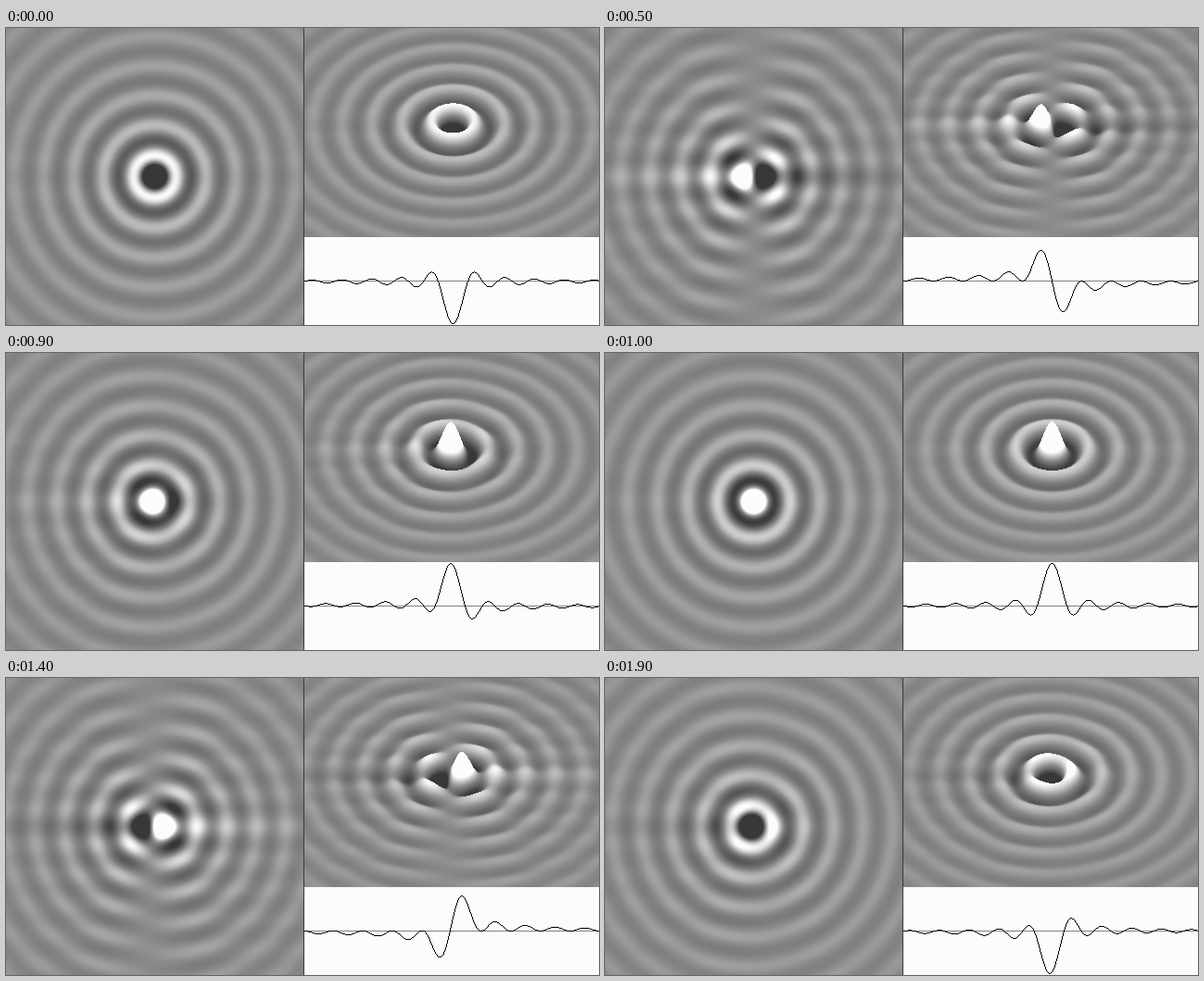
These frames come from a looping animation (640 px wide and 321 px high, 2 s). A matplotlib script:

```python
import numpy as np
import matplotlib.pyplot as plt
from matplotlib.animation import FuncAnimation

W, H, DPI = 640, 321, 100
FRAMES, INTERVAL = 20, 100
K = 2 * np.pi / 32              # wave number, wavelength 32 px
RIM = 0.01                      # slight excess of waves at the equator
CENTER = 160
SPLIT = 321                     # column of the divider
VIEW_H = 226                    # height of the perspective view
BASE_Y, TILT, LIFT = 105, 0.70, 30
AXIS_Y, AMP = 273, 46
DARK, MID, LIGHT = 56, 140, 252

z_tab = np.linspace(0, 50, 5001)
angles = (np.arange(120) + 0.5) * np.pi / 120
j0_tab = np.cos(z_tab[:, None] * np.sin(angles)).mean(axis=1)


def bessel0(z):
    return np.interp(np.abs(z), z_tab, j0_tab)


def hemisphere_waves(x, y):
    """Even and odd parts of plane waves summed over a half sphere."""
    mu, w = np.polynomial.legendre.leggauss(80)
    mu, w = (mu + 1) / 2, w / 2
    y = y[:, None]
    radial = bessel0(K * y * np.sqrt(1 - mu**2)) * w
    odd = radial @ np.sin(K * mu[:, None] * x)
    even = np.sinc(K * np.hypot(x, y) / np.pi) + RIM * bessel0(K * y)
    return even, odd


def shade(u):
    gain = np.where(u > 0, 500, 360)
    return np.clip(MID + gain * u, DARK, LIGHT).astype(np.uint8)


x_flat = np.arange(SPLIT) - CENTER
x_view = np.arange(W - SPLIT - 1) - CENTER
x_line = np.arange(-0.5, len(x_view)) - CENTER
y_view = np.arange(-185, 200, 0.25)
flat = hemisphere_waves(x_flat, x_flat)
view = hemisphere_waves(x_view, y_view)
line = hemisphere_waves(x_view, np.zeros(1))
edges = hemisphere_waves(x_line, np.zeros(1))
cols = np.broadcast_to(np.arange(len(x_view)), view[0].shape)
plot_rows = np.arange(VIEW_H, H)[:, None]


def wave(parts, phase):
    even, odd = parts
    return -np.cos(phase) * even - np.sin(phase) * odd


def perspective(u):
    """Paint the surface from back to front so near crests hide far ones."""
    rows = np.rint(BASE_Y + TILT * y_view[:, None] - LIFT * u).astype(int)
    seen = (rows >= 0) & (rows < VIEW_H)
    out = np.full((VIEW_H, len(x_view)), MID, np.uint8)
    out[rows[seen], cols[seen]] = shade(u)[seen]
    return out


def graph(phase):
    """Section through the centre as a one-pixel line."""
    y = AXIS_Y - AMP * wave(line, phase)[0]
    ends = AXIS_Y - AMP * wave(edges, phase)[0]
    low = np.minimum(ends[:-1], ends[1:])
    high = np.maximum(ends[:-1], ends[1:])
    inside = (plot_rows >= low) & (plot_rows < high)
    out = np.full(inside.shape, LIGHT, np.uint8)
    out[AXIS_Y - VIEW_H] = 128
    out[inside | (plot_rows == np.rint(y))] = 0
    return out


def picture(phase):
    img = np.empty((H, W), np.uint8)
    img[:, :SPLIT] = shade(wave(flat, phase))
    img[:, SPLIT] = DARK
    img[:VIEW_H, SPLIT + 1:] = perspective(wave(view, phase))
    img[VIEW_H:, SPLIT + 1:] = graph(phase)
    return img


fig = plt.figure(figsize=(W / DPI, H / DPI), dpi=DPI)
ax = fig.add_axes([0, 0, 1, 1])
ax.axis("off")
image = ax.imshow(picture(0), cmap="gray", vmin=0, vmax=255,
                  interpolation="nearest", aspect="auto")


def update(i):
    image.set_data(picture(2 * np.pi * i / FRAMES))
    return image,


anim = FuncAnimation(fig, update, frames=FRAMES, interval=INTERVAL,
                     init_func=lambda: update(0), repeat=True, repeat_delay=0)
plt.show()
```
